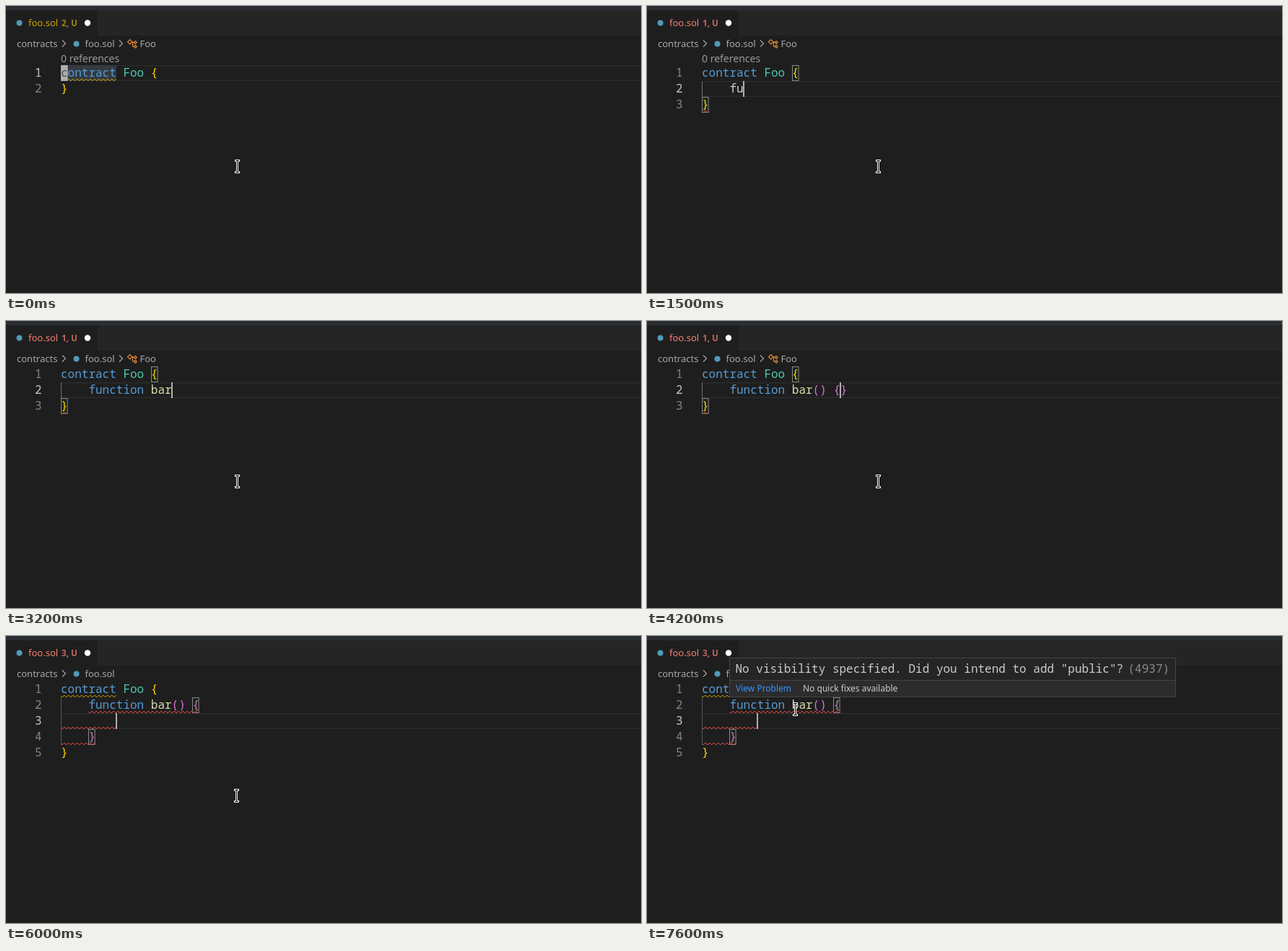
An HTML page with a canvas that plays this animation: 880 by 398 pixels, repeating every 8 s.

```html
<!DOCTYPE html>
<html lang="en">
<head>
<meta charset="utf-8">
<title>Editor typing</title>
<style>
html, body { margin: 0; width: 100%; height: 100%; overflow: hidden; background: #1e1e1e; }
canvas { display: block; width: 880px; height: 398px; }
</style>
</head>
<body>
<canvas id="stage"></canvas>
<script>
const W = 880, H = 398, LOOP = 8000;
const LEFT = 76, CHAR = 9.6, ROW = 22;
const BLUE = '#569cd6', TEAL = '#4ec9b0', GOLD = '#ffd700', PINK = '#da70d6';
const PLAIN = '#d4d4d4', WARN = '#cca700', ERROR = '#f14c4c', CRUMB = '#a9a9a9';
const MONO = '16px "Noto Sans Mono", monospace';
const ui = (size, weight = 400) => `${weight} ${size}px "Noto Sans", sans-serif`;

const canvas = document.getElementById('stage');
const ctx = canvas.getContext('2d', { alpha: false });
const dpr = window.devicePixelRatio || 1;
canvas.width = W * dpr;
canvas.height = H * dpr;

// Second line as it is typed; "|" marks a caret that is not at the end.
const TYPED = [
  [900, ''], [1300, 'f'], [1500, 'fu'], [1600, 'fun'], [1700, 'func'],
  [1900, 'functi'], [2100, 'functio'], [2200, 'function'], [2500, 'function '],
  [2700, 'function b'], [2800, 'function ba'], [3100, 'function bar'],
  [3400, 'function bar(|)'], [3600, 'function bar()'], [3900, 'function bar() '],
  [4200, 'function bar() {|}']
];

function rect(x, y, w, h, color) {
  ctx.fillStyle = color;
  ctx.fillRect(x, y, w, h);
}

function text(str, x, y, font, color) {
  ctx.font = font;
  ctx.fillStyle = color;
  ctx.fillText(str, x, y);
}

function dot(x, y, r, color) {
  ctx.fillStyle = color;
  ctx.beginPath();
  ctx.arc(x, y, r, 0, Math.PI * 2);
  ctx.fill();
}

function path(points, color, width = 1) {
  ctx.strokeStyle = color;
  ctx.lineWidth = width;
  ctx.beginPath();
  points.forEach(([x, y]) => ctx.lineTo(x, y));
  ctx.stroke();
}

const colX = col => LEFT + col * CHAR;

function editorState(t) {
  const s = { top: t < 2900 ? 82 : 63, lens: t < 2900, row: 0, col: 0, boxes: [], waves: [] };
  const head = [['contract', BLUE, 0], ['Foo', TEAL, 9], ['{', GOLD, 13]];
  const end = [['}', GOLD, 0]];

  if (t < 900) {
    s.lines = [head, end];
  } else if (t < 4600) {
    const typed = TYPED.filter(step => step[0] <= t).pop()[1];
    const caret = typed.indexOf('|');
    s.row = 1;
    s.col = 4 + (caret < 0 ? typed.length : caret);
    s.lines = [head, bodyTokens(typed.replace('|', '')), end];
    // Bracket matching trails the typing by one step.
    if (t >= 4300) s.boxes = [[1, 19], [1, 20]];
    else if (t >= 3500 && t < 4000) s.boxes = [[1, 16], [1, 17]];
    else s.boxes = [[0, 13], [2, 0]];
  } else {
    s.row = 2;
    s.col = 8;
    s.lines = [head, bodyTokens('function bar() {'), [], [['}', PINK, 4]], end];
    s.boxes = [[1, 19], [3, 4]];
  }

  if (t < 1400 || t >= 4400) s.waves.push([0, 0, 8, WARN]);
  if (t >= 1400 && t < 4400) s.waves.push([2, 0, 1, ERROR]);
  if (t >= 4600) s.waves.push([1, 4, 20, ERROR], [2, 0, 8, ERROR], [3, 0, 5, ERROR]);
  else if (t >= 4400) s.waves.push([1, 4, 21, ERROR]);
  return s;
}

function bodyTokens(code) {
  const m = /^(function )(\w+)(.*)$/.exec(code);
  if (!m) return [[code, PLAIN, 4]];
  return [['function', BLUE, 4], [m[2], '#dcdcaa', 13], [m[3], PINK, 13 + m[2].length]];
}

function wave(x1, x2, bottom, color) {
  ctx.save();
  ctx.beginPath();
  ctx.rect(x1, bottom - 3, x2 - x1, 3);
  ctx.clip();
  const points = [];
  for (let x = x1 - 4.25; x < x2 + 6; x += 6) {
    points.push([x, bottom], [x + 3, bottom - 3]);
  }
  path(points, color, 1);
  ctx.restore();
}

function drawHeader(t) {
  rect(0, 0, W, 6, '#2a2e32');
  rect(0, 6, W, 35, '#252526');
  rect(0, 6, 127, 35, '#1e1e1e');
  dot(18.5, 23.5, 4, '#519aba');
  const color = t < 1400 ? WARN : '#f88070';
  const count = t < 1400 ? 2 : t < 4400 ? 1 : 3;
  text('foo.sol', 31, 28, ui(13), color);
  ctx.globalAlpha = 0.75;
  text(count + ', U', 77, 28, ui(11.7, 600), color);
  ctx.globalAlpha = 1;
  dot(113, 23.5, 4.2, '#ffffff');

  text('contracts', 15, 57, ui(13), CRUMB);
  chevron(78);
  dot(97.5, 52.5, 4, '#519aba');
  text('foo.sol', 109.5, 57, ui(13), CRUMB);
  if (t < 4900) {
    chevron(157);
    classIcon();
    text('Foo', 185.5, 57, ui(13), CRUMB);
  }
}

function chevron(x) {
  path([[x, 47.5], [x + 4.5, 52], [x, 56.5]], CRUMB, 1.1);
}

function diamond(x, y, rx, ry) {
  path([[x - rx, y], [x, y - ry], [x + rx, y], [x, y + ry], [x - rx, y], [x, y - ry]], '#e58b35', 1.2);
}

function classIcon() {
  diamond(171.7, 49.8, 3.2, 3.2);
  path([[174.5, 50], [178, 50]], '#e58b35', 1.2);
  path([[175.5, 50], [175.5, 56], [178, 56]], '#e58b35', 1.2);
  diamond(179.3, 50.6, 1.9, 1.9);
  diamond(179.3, 56.2, 1.9, 1.9);
}

function drawEditor(t) {
  const s = editorState(t);
  const rowY = row => s.top + row * ROW;
  const y = rowY(s.row);
  const blinkOn = t < 900 ? t < 200 || t >= 700
    : t < 4600 || Math.floor((t - 4600) / 500) % 2 === 0;

  rect(LEFT, y, W - LEFT, 1.5, '#2b2b2b');
  rect(LEFT, y + ROW - 1.5, W - LEFT, 1.5, '#2b2b2b');
  if (s.lens) text('0 references', LEFT, 78, ui(14), '#999999');
  if (t < 900) rect(LEFT, y, 8 * CHAR, ROW, '#343a40');

  const guideRows = s.lines.length - 2;
  if (guideRows) rect(LEFT, rowY(1), 1, guideRows * ROW, t < 4600 ? '#707070' : '#585858');

  s.boxes.forEach(([row, col]) => {
    const x = Math.round(colX(col));
    rect(x, rowY(row), 9, ROW, 'rgba(0,100,0,0.1)');
    ctx.strokeStyle = '#888888';
    ctx.lineWidth = 1;
    ctx.strokeRect(x + 0.5, rowY(row) + 0.5, 8.6, ROW - 1);
  });

  s.lines.forEach((tokens, row) => {
    const base = rowY(row) + 16;
    text(String(row + 1), 40, base, MONO, row === s.row ? '#c6c6c6' : '#858585');
    tokens.forEach(([str, color, col]) => text(str, colX(col), base, MONO, color));
  });
  s.waves.forEach(([row, from, to, color]) => wave(LEFT + from * CHAR, colX(to), rowY(row) + ROW, color));

  if (!blinkOn) return;
  if (t < 900) {
    rect(LEFT, y, CHAR, ROW, '#aeafad');
    text('c', LEFT, y + 16, MONO, '#515052');
  } else {
    rect(Math.floor(75.5 + s.col * CHAR), y, 2, ROW, '#aeafad');
  }
}

function drawHover(t) {
  if (t < 7000) return;
  rect(114, 30, 619, 55, '#454545');
  rect(115, 31, 617, 53, '#252526');
  rect(115, 61, 617, 1, '#454545');
  rect(115, 62, 617, 22, '#2c2c2d');
  text('No visibility specified. Did you intend to add "public"?', 122.5, 51, MONO, '#cccccc');
  text('(4937)', 666.5, 51, MONO, '#898989');
  text('View Problem', 123, 77, ui(12), '#3794ff');
  if (t >= 7200) text('No quick fixes available', 216, 77, ui(12), '#cccccc');
}

function drawPointer(t) {
  const p = Math.min(1, Math.max(0, (t - 5900) / 900));
  const e = p < 0.5 ? 4 * p ** 3 : 1 - 4 * (1 - p) ** 3;
  const x = Math.round(317 - 115 * e), y = Math.round(213 - 121 * e);
  rect(x, y, 7, 3, '#ffffff');
  rect(x, y + 16, 7, 3, '#ffffff');
  rect(x + 2, y + 2, 3, 15, '#ffffff');
  rect(x + 1, y + 1, 5, 1, '#000000');
  rect(x + 1, y + 17, 5, 1, '#000000');
  rect(x + 3, y + 1, 1, 17, '#000000');
}

const start = performance.now();

function draw(now) {
  const t = Math.floor((Math.max(0, now - start) % LOOP) / 100) * 100;
  ctx.setTransform(dpr, 0, 0, dpr, 0, 0);
  rect(0, 0, W, H, '#1e1e1e');
  drawHeader(t);
  drawEditor(t);
  drawHover(t);
  drawPointer(t);
  requestAnimationFrame(draw);
}

draw(start);
</script>
</body>
</html>
```
